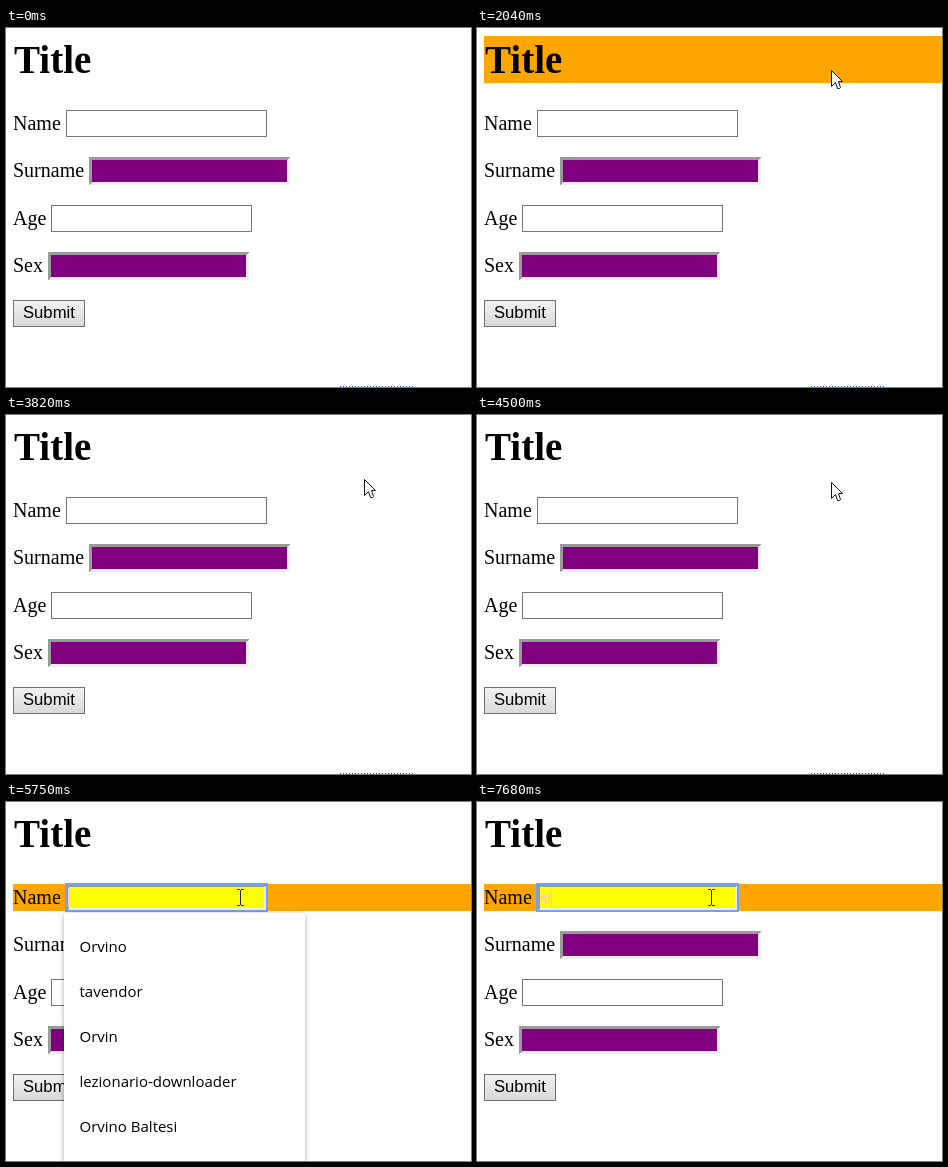
Write an HTML page with a canvas that moves like this. It is 465 by 359 pixels and loops after 8000 ms.

```html
<!DOCTYPE html>
<html lang="en">
<head>
<meta charset="utf-8">
<title>Form hover</title>
<style>
  html, body { margin: 0; width: 100%; height: 100%; overflow: hidden; background: #fff; }
  canvas { display: block; }
</style>
</head>
<body>
<canvas id="stage" width="465" height="359"></canvas>
<script>
const ctx = document.getElementById('stage').getContext('2d');
const SERIF = '"Liberation Serif", serif';
const SANS = '16.67px "Liberation Sans", sans-serif';
const MENU = '500 15px "Open Sans", "Noto Sans", sans-serif';
const ORANGE = '#ffa500', PINK = '#ffc0cb';

const LOOP = 8000, STEP = 77, BLINK = 530;
const CLICK = 5660, MENU_OPEN = 5750, TYPE_1 = 7460, TYPE_2 = 7680;

const LEFT = 7, FIELD_W = 201;
const LABELS = ['Name', 'Surname', 'Age', 'Sex'];
const SUGGESTIONS = ['Orvino', 'tavendor', 'Orvin', 'lezionario-downloader', 'Orvino Baltesi'];

// Pointer moves: start, end, and the point reached
const ENTRY = { at: 1190, x: 450, y: 300 };
const MOVES = [
  [1190, 1800, 367, 68],
  [1800, 2040, 354, 42],
  [2740, 2740, 354, 111],
  [2740, 2820, 354, 124],
  [3525, 3820, 358, 64],
  [3820, 3960, 356, 48],
  [4500, 4500, 354, 67],
  [4500, 4730, 362, 106],
  [4893, 5360, 234, 95]
];

const easeOut = u => 1 - (1 - u) ** 2;

// The pointer is seen in coarse time steps, so each move advances in jumps
function pointerAt(t) {
  if (t < ENTRY.at) return null;
  let { x, y } = ENTRY;
  for (const [start, end, toX, toY] of MOVES) {
    if (t < start) break;
    let k = 1;
    if (t < end) {
      const steps = Math.round((end - start) / STEP);
      k = easeOut(Math.floor((t - start) / (end - start) * steps) / steps);
    }
    x += (toX - x) * k;
    y += (toY - y) * k;
  }
  return { x: Math.round(x), y: Math.round(y) };
}

function rect(x, y, w, h, color) {
  ctx.fillStyle = color;
  ctx.fillRect(x, y, w, h);
}

function text(str, x, y, font, color = '#000') {
  ctx.font = font;
  ctx.fillStyle = color;
  ctx.fillText(str, x, y);
  return ctx.measureText(str).width;
}

function plainBox(x, y) {
  rect(x, y, FIELD_W, 27, '#767676');
  rect(x + 1, y + 1, FIELD_W - 2, 25, '#fff');
}

function insetBox(x, y, h, color) {
  rect(x, y, FIELD_W, h, '#eee');
  for (let i = 0; i < 3; i++) {
    rect(x, y + i, FIELD_W - i, 1, '#9a9a9a');
    rect(x + i, y, 1, h - i, '#9a9a9a');
  }
  rect(x + 3, y + 3, FIELD_W - 6, h - 6, color);
}

function drawButton(y) {
  const shade = ctx.createLinearGradient(0, y, 0, y + 27);
  shade.addColorStop(0, '#f2f2f2');
  shade.addColorStop(1, '#d8d8d8');
  rect(LEFT, y, 72, 27, '#707070');
  rect(LEFT + 1, y + 1, 70, 25, shade);
  text('Submit', LEFT + 10, y + 18, SANS);
}

function drawFocus(x, y, t) {
  ctx.strokeStyle = '#6fa3ef';
  ctx.lineWidth = 2;
  ctx.strokeRect(x, y, FIELD_W, 27);

  const typed = t >= TYPE_2 ? 'xi' : t >= TYPE_1 ? 'x' : '';
  const width = text(typed, x + 2, y + 19, SANS, PINK);
  const caretOn = typed || Math.floor((t - CLICK) / BLINK) % 2 === 0;
  if (caretOn) rect(x + 2 + Math.floor(width), y + 4, 1, 19, PINK);
}

function drawMenu() {
  ctx.save();
  ctx.shadowColor = 'rgba(0,0,0,.35)';
  ctx.shadowBlur = 5;
  ctx.shadowOffsetY = 1;
  ctx.fillStyle = '#fff';
  ctx.beginPath();
  ctx.roundRect(58, 111, 241, 270, 3);
  ctx.fill();
  ctx.restore();
  SUGGESTIONS.forEach((s, i) => text(s, 73.5, 150 + i * 45, MENU));
}

function drawArrow(x, y) {
  ctx.beginPath();
  [[0, 0], [0, 16], [4, 12], [6, 18], [8, 18], [9, 17], [7, 11], [11, 11]]
    .forEach(([dx, dy]) => ctx.lineTo(x + dx + .5, y + dy + .5));
  ctx.closePath();
  ctx.fillStyle = '#fff';
  ctx.fill();
  ctx.strokeStyle = '#10101c';
  ctx.lineWidth = 1;
  ctx.stroke();
}

function drawBeam(x, y) {
  rect(x, y - 7, 1, 15, '#222');
  for (const dy of [-8, 8]) {
    rect(x - 3, y + dy, 3, 1, '#222');
    rect(x + 1, y + dy, 3, 1, '#222');
  }
}

function draw(t) {
  const p = pointerAt(t);
  const over = (y, h) => p && p.y >= y && p.y < y + h;
  const highlight = (y, h) => { if (over(y, h)) rect(LEFT, y, 465 - LEFT, h, ORANGE); };
  const rowY = i => Math.floor(82 + 47.5 * i);
  let beam = false;

  rect(0, 0, 465, 359, '#fff');
  highlight(8, 47);
  text('Title', 8, 45, 'bold 39px ' + SERIF);

  LABELS.forEach((label, i) => {
    const y = rowY(i), required = i % 2 === 1, h = required ? 28 : 27;
    highlight(y, h);
    const x = Math.round(LEFT + 5 + text(label, LEFT, y + 20, '20px ' + SERIF));
    const hovered = over(y, h) && p.x >= x && p.x < x + FIELD_W;
    if (hovered) beam = true;

    if (required) insetBox(x, y, h, '#800080');
    else if (hovered) insetBox(x, y, h, '#ff0');
    else plainBox(x, y);
    if (hovered && t >= CLICK) drawFocus(x, y, t);
  });

  const buttonY = rowY(LABELS.length);
  highlight(buttonY, 27);
  drawButton(buttonY);

  if (t < CLICK) for (let x = 334; x < 408; x += 3) rect(x, 358, 1, 1, '#2f55a4');
  if (t >= MENU_OPEN && t < TYPE_1) drawMenu();
  if (p) (beam ? drawBeam : drawArrow)(p.x, p.y);
}

const start = performance.now();
function tick() {
  draw((performance.now() - start) % LOOP);
  requestAnimationFrame(tick);
}
tick();
</script>
</body>
</html>
```
